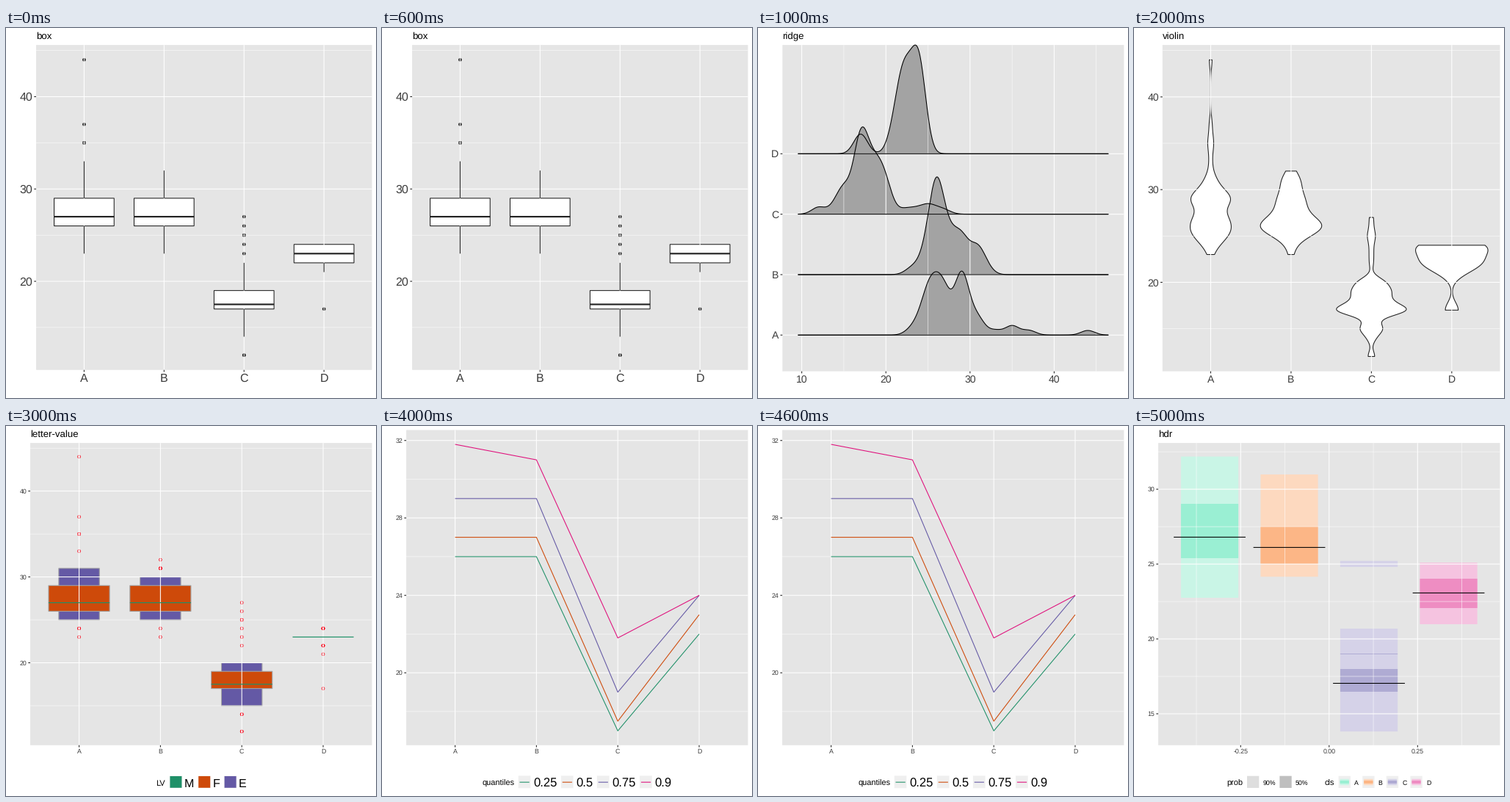
Recreate the animation shown at these times as a matplotlib script. Size 504 px wide and 504 px high, loop 6 s.

```python
import matplotlib.pyplot as plt
import numpy as np
from matplotlib.animation import FuncAnimation
from matplotlib.patches import Circle, Polygon, Rectangle

plt.rcParams["font.family"] = "Liberation Sans"
plt.rcParams["text.hinting"] = "none"

SIZE = 504
LINE = 1.07
INK, AXIS, PANEL, KEY, MID = "#222222", "#3c3c3c", "#e5e5e5", "#efefef", "#a3a3a3"
TEAL, ORANGE, PURPLE, PINK = "#1f9068", "#ce4a0a", "#6459a5", "#e0107c"

# first value and how often it and the following values occur
COUNTS = {
    "A": (23, [1, 2, 7, 7, 7, 1, 12, 2, 3, 0, 1, 0, 2, 0, 1] + [0] * 6 + [1]),
    "B": (23, [1, 1, 4, 14, 5, 4, 5, 2, 4, 1]),
    "C": (12, [2, 0, 2, 6, 2, 19, 8, 9, 7, 0, 1, 1, 1, 2, 1, 1]),
    "D": (17, [1, 0, 0, 0, 1, 3, 2, 4]),
}
DATA = {k: np.repeat(np.arange(lo, lo + len(n)), n) for k, (lo, n) in COUNTS.items()}
CLASSES = list(DATA)

fig = plt.figure(figsize=(SIZE / 72, SIZE / 72), dpi=72, facecolor="white")
ax = fig.add_axes([0, 0, 1, 1])


def bandwidth(v):
    q1, q3 = np.quantile(v, [0.25, 0.75])
    return 0.9 * min(v.std(ddof=1), (q3 - q1) / 1.34) * len(v) ** -0.2


def density(v, grid, bw):
    z = (grid[:, None] - v) / bw
    return np.exp(-z * z / 2).sum(axis=1) / (len(v) * bw * np.sqrt(2 * np.pi))


def rect(x0, y0, x1, y1, fill, edge="none", lw=LINE):
    ax.add_patch(Rectangle((x0, y0), x1 - x0, y1 - y0, facecolor=fill,
                           edgecolor=edge, linewidth=lw, snap=False))


def line(xs, ys, color=INK, lw=LINE):
    ax.plot(xs, ys, color=color, lw=lw, solid_capstyle="butt", snap=False)


def shape(xs, ys, fill, edge):
    ax.add_patch(Polygon(np.column_stack([xs, ys]), closed=True, facecolor=fill,
                         edgecolor=edge, linewidth=LINE, snap=False))


def text(x, y, s, size, color="black", ha="left"):
    ax.text(x, y, s, fontsize=size, color=color, ha=ha, va="baseline")


def scale(v0, p0, v1, p1):
    return lambda v: p0 + (np.asarray(v) - v0) * (p1 - p0) / (v1 - v0)


def panel(x0, y0, x1, y1, xs, ys, size, minor_x=(), minor_y=()):
    """Grey panel with grid, ticks and labels; xs and ys map label to position."""
    rect(x0, y0, x1, y1, PANEL)
    for x in minor_x:
        line([x, x], [y0, y1], "white", 0.53)
    for y in minor_y:
        line([x0, x1], [y, y], "white", 0.53)
    for s, x in xs.items():
        line([x, x], [y0, y1], "white")
        line([x, x], [y1, y1 + 2.75], INK)
        text(x, y1 + 4.95 + 0.716 * size, s, size, AXIS, "center")
    for s, y in ys.items():
        line([x0, x1], [y, y], "white")
        line([x0 - 2.75, x0], [y, y], INK)
        text(x0 - 4.95, y + 0.36 * size, s, size, AXIS, "right")


def title(x, s):
    text(x, 15.1, s, 13.2)


def class_scale(x0, x1):
    return scale(0.4, x0, 4.6, x1)


def class_panel(x0, y0, y1, size, lo, hi, major, minor):
    """Panel with the classes along x; returns both scales."""
    fx, fy = class_scale(x0, 498.5), scale(lo, y1, hi, y0)
    panel(x0, y0, 498.5, y1, {c: fx(i + 1) for i, c in enumerate(CLASSES)},
          {str(v): fy(v) for v in major}, size, minor_y=[fy(v) for v in minor])
    return fx, fy


def box():
    fx, fy = class_panel(41.05, 23.15, 465.75, 16, 10.4, 45.6, (20, 30, 40), (15, 25, 35, 45))
    title(41.05, "box")
    half = 0.375 * (fx(1) - fx(0))
    for i, v in enumerate(DATA.values()):
        x = fx(i + 1)
        q1, q2, q3 = np.quantile(v, [0.25, 0.5, 0.75])
        reach = 1.5 * (q3 - q1)
        inside = (v >= q1 - reach) & (v <= q3 + reach)
        for p in v[~inside]:
            ax.add_patch(Circle((x, fy(p)), 2.3, facecolor=INK, edgecolor="none"))
        line([x, x], [fy(q3), fy(v[inside].max())])
        line([x, x], [fy(q1), fy(v[inside].min())])
        rect(x - half, fy(q3), x + half, fy(q1), "white", INK)
        line([x - half, x + half], [fy(q2)] * 2, lw=2.13)


def ridge():
    x0, y0, x1, y1 = 33.3, 23.15, 498.5, 467.65
    bw = np.mean([bandwidth(v) for v in DATA.values()])
    lo, hi = 12 - 3 * bw, 44 + 3 * bw
    pad = 0.05 * (hi - lo)
    fx, fy = scale(lo - pad, x0, hi + pad, x1), scale(0.4, y1, 5.8, y0)
    panel(x0, y0, x1, y1, {str(v): fx(v) for v in (10, 20, 30, 40)},
          {c: fy(i + 1) for i, c in enumerate(CLASSES)}, 14,
          minor_x=[fx(v) for v in (15, 25, 35, 45)])
    title(x0, "ridge")
    grid = np.linspace(lo, hi, 512)
    curves = [density(v, grid, bw) for v in DATA.values()]
    top = max(c.max() for c in curves)
    for i in (3, 2, 1, 0):
        xs, ys = fx(grid), fy(i + 1 + 1.8 * curves[i] / top)
        base = fy(i + 1)
        shape(np.r_[xs, xs[::-1]], np.r_[ys, np.full(512, base)], MID, "none")
        line(xs[[0, -1]], [base, base], "black")
        line(xs, ys, "black")


def violin():
    fx, fy = class_panel(38.8, 23.15, 467.65, 14, 10.4, 45.6, (20, 30, 40), (15, 25, 35, 45))
    title(38.8, "violin")
    grids = [np.linspace(v.min(), v.max(), 512) for v in DATA.values()]
    curves = [density(v, g, bandwidth(v)) for v, g in zip(DATA.values(), grids)]
    top = max(c.max() for c in curves)
    for i, (g, c) in enumerate(zip(grids, curves)):
        w = 0.45 * c / top
        shape(fx(np.r_[i + 1 - w, (i + 1 + w)[::-1]]), fy(np.r_[g, g[::-1]]), "white", INK)


def letter_value():
    fx, fy = class_panel(33.06, 23.15, 434.8, 8.8, 10.4, 45.6, (20, 30, 40), (15, 25, 35, 45))
    title(33.06, "letter-value")
    unit = fx(1) - fx(0)
    for i, v in enumerate(DATA.values()):
        x = fx(i + 1)
        mid = np.median(v)
        lo = hi = mid
        if len(v) > 20:
            for p, half, color in ((0.125, 0.25, PURPLE), (0.25, 0.375, ORANGE)):
                a, b = np.quantile(v, [p, 1 - p])
                rect(x - half * unit, fy(b), x + half * unit, fy(a), color, MID)
                lo, hi = min(lo, a), max(hi, b)
        line([x - 0.375 * unit, x + 0.375 * unit], [fy(mid)] * 2, TEAL, 1.2)
        for p in v[(v < lo) | (v > hi)]:
            ax.add_patch(Circle((x, fy(p)), 1.95, facecolor="none",
                                edgecolor="#fb0216", linewidth=0.72))
    text(203.9, 490, "LV", 11)
    for x, s, color in ((222.8, "M", TEAL), (261.6, "F", ORANGE), (297, "E", PURPLE)):
        rect(x, 476.4, x + 17.28, 493.2, KEY)
        rect(x + 0.6, 477, x + 16.6, 492.8, color)
        text(x + 20.1, 491.6, s, 16)


def quantiles():
    fx, fy = class_panel(33.06, 5.5, 434.8, 8.8, 16.26, 32.54, (20, 24, 28, 32), (18, 22, 26, 30))
    xs = [fx(i) for i in (1, 2, 3, 4)]
    text(136.7, 490, "quantiles", 11)
    x = 185.7
    for q, color in ((0.25, TEAL), (0.5, ORANGE), (0.75, PURPLE), (0.9, PINK)):
        line(xs, [fy(np.quantile(v, q)) for v in DATA.values()], color)
        rect(x, 476.4, x + 16.6, 493.2, KEY)
        line([x + 1.8, x + 15], [485.2, 485.2], color)
        text(x + 20.5, 491.5, str(q), 16.6)
        x += 58.2 if len(str(q)) == 4 else 49


def hdr():
    x0, y0, x1, y1 = 33.06, 23.15, 498.5, 434.8
    fx, fy = scale(0, 265.78, 0.25, 386.3), scale(30, 86.1, 15, 392)
    panel(x0, y0, x1, y1, {f"{v:.2f}": fx(v) for v in (-0.25, 0, 0.25)},
          {str(v): fy(v) for v in (15, 20, 25, 30)}, 8.8,
          [fx(v) for v in (-0.375, -0.125, 0.125, 0.375)],
          [fy(v) for v in (17.5, 22.5, 27.5, 32.5)])
    title(x0, "hdr")
    tones = (("#c9f5e6", "#9aefd3"), ("#fdd9bf", "#fcb686"),
             ("#d5d2e8", "#afabd3"), ("#f5c3e0", "#ee8dc2"))
    # wide spans, narrow spans and mode, in pixels from the top
    spans = (([(41.6, 234)], [(106, 180)], 151.4),
             ([(66, 205.3)], [(137, 188)], 165.4),
             ([(183.8, 192), (276, 416.1)], [(310, 311), (331, 362)], 350.5),
             ([(186, 270)], [(208, 248)], 227.4))
    for i, (wide, narrow, mode) in enumerate(spans):
        x = 265.78 + (i - 1.5) * 108.5
        for part, color in zip((wide, narrow), tones[i]):
            for a, b in part:
                rect(x - 39.1, a, x + 39.1, b, color)
        line([x - 48.9, x + 48.9], [mode, mode], "black")
    text(126.6, 490, "prob", 11)
    for x, s, color in ((154, "90%", "#dedede"), (198.4, "50%", "#bfbfbf")):
        rect(x, 476.7, x + 16.3, 493, color)
        text(x + 21.4, 489, s, 8.8)
    text(259.6, 490, "cls", 11)
    for i, (light, dark) in enumerate(tones):
        x = 278.6 + 32.6 * i
        rect(x, 476.7, x + 16.3, 493, KEY)
        rect(x + 2, 480.8, x + 14.3, 489.2, light)
        rect(x + 2, 483, x + 14.3, 487, dark)
        text(x + 21.4, 489, CLASSES[i], 8.8)


SCENES = [box, ridge, violin, letter_value, quantiles, hdr]


def draw(i):
    ax.clear()
    ax.set_xlim(0, SIZE)
    ax.set_ylim(SIZE, 0)
    ax.axis("off")
    SCENES[i % len(SCENES)]()
    return []


anim = FuncAnimation(fig, draw, frames=len(SCENES), interval=1000, repeat=True,
                     repeat_delay=0, blit=False)
plt.show()
```
